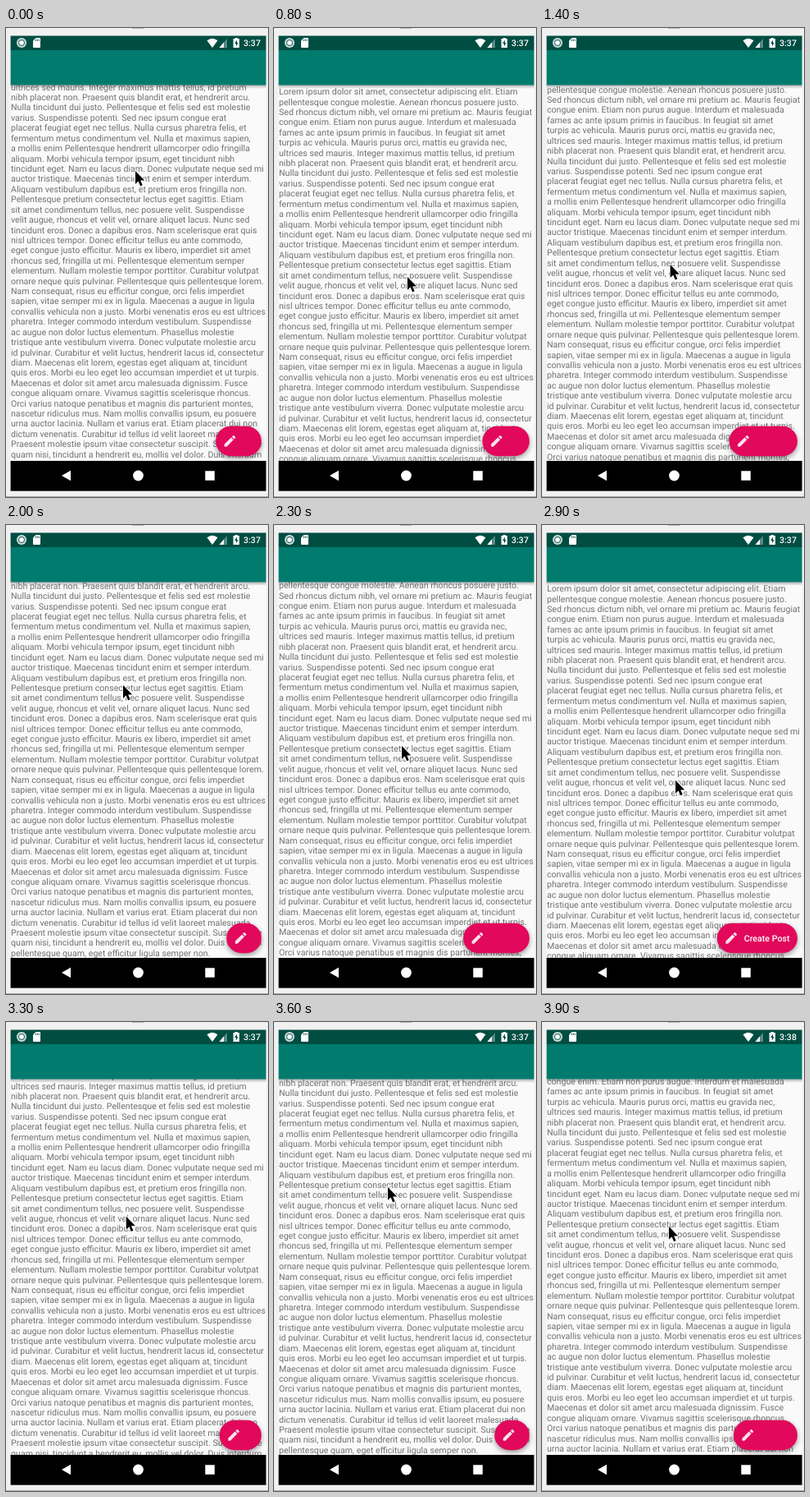
Write an HTML page with a canvas that moves like this. It is 320x571 px and loops after 4000 ms.

```html
<!DOCTYPE html>
<html lang="en">
<head>
<meta charset="utf-8">
<title>Collapsing button on scroll</title>
<style>
  html, body { margin: 0; width: 320px; height: 571px; overflow: hidden; background: #f1f1f1; }
  canvas { display: block; }
</style>
</head>
<body>
<canvas id="stage" width="320" height="571"></canvas>
<script>
const LINES = `Lorem ipsum dolor sit amet, consectetur adipiscing elit. Etiam
pellentesque congue molestie. Aenean rhoncus posuere justo.
Sed rhoncus dictum nibh, vel ornare mi pretium ac. Mauris feugiat
congue enim. Etiam non purus augue. Interdum et malesuada
fames ac ante ipsum primis in faucibus. In feugiat sit amet
turpis ac vehicula. Mauris purus orci, mattis eu gravida nec,
ultrices sed mauris. Integer maximus mattis tellus, id pretium
nibh placerat non. Praesent quis blandit erat, et hendrerit arcu.
Nulla tincidunt dui justo. Pellentesque et felis sed est molestie
varius. Suspendisse potenti. Sed nec ipsum congue erat
placerat feugiat eget nec tellus. Nulla cursus pharetra felis, et
fermentum metus condimentum vel. Nulla et maximus sapien,
a mollis enim Pellentesque hendrerit ullamcorper odio fringilla
aliquam. Morbi vehicula tempor ipsum, eget tincidunt nibh
tincidunt eget. Nam eu lacus diam. Donec vulputate neque sed mi
auctor tristique. Maecenas tincidunt enim et semper interdum.
Aliquam vestibulum dapibus est, et pretium eros fringilla non.
Pellentesque pretium consectetur lectus eget sagittis. Etiam
sit amet condimentum tellus, nec posuere velit. Suspendisse
velit augue, rhoncus et velit vel, ornare aliquet lacus. Nunc sed
tincidunt eros. Donec a dapibus eros. Nam scelerisque erat quis
nisl ultrices tempor. Donec efficitur tellus eu ante commodo,
eget congue justo efficitur. Mauris ex libero, imperdiet sit amet
rhoncus sed, fringilla ut mi. Pellentesque elementum semper
elementum. Nullam molestie tempor porttitor. Curabitur volutpat
ornare neque quis pulvinar. Pellentesque quis pellentesque lorem.
Nam consequat, risus eu efficitur congue, orci felis imperdiet
sapien, vitae semper mi ex in ligula. Maecenas a augue in ligula
convallis vehicula non a justo. Morbi venenatis eros eu est ultrices
pharetra. Integer commodo interdum vestibulum. Suspendisse
ac augue non dolor luctus elementum. Phasellus molestie
tristique ante vestibulum viverra. Donec vulputate molestie arcu
id pulvinar. Curabitur et velit luctus, hendrerit lacus id, consectetur
diam. Maecenas elit lorem, egestas eget aliquam at, tincidunt
quis eros. Morbi eu leo eget leo accumsan imperdiet et ut turpis.
Maecenas et dolor sit amet arcu malesuada dignissim. Fusce
congue aliquam ornare. Vivamus sagittis scelerisque rhoncus.
Orci varius natoque penatibus et magnis dis parturient montes,
nascetur ridiculus mus. Nam mollis convallis ipsum, eu posuere
urna auctor lacinia. Nullam et varius erat. Etiam placerat dui non
dictum venenatis. Curabitur id tellus id velit laoreet malesuada.
Praesent molestie ipsum vitae consectetur suscipit. Suspendisse
quam nisi, tincidunt a hendrerit eu, mollis vel dolor. Duis interdum
pellentesque quam, eget efficitur ligula semper non.`.split('\n');

const LOOP = 4000, TICK = 100, LINE_HEIGHT = 12.42, MAX_SCROLL = 90.3;
const LEFT = 5.6, WIDTH = 312;
const FONT = '10.63px Roboto, sans-serif';

// Pointer stops: time, x, y
const STOPS = [
  [0, 158, 174], [620, 158, 174], [800, 163, 303], [1240, 159, 303], [1900, 142, 195],
  [2000, 143, 195], [2500, 163, 308], [2700, 163, 309], [2950, 163, 311],
  [3520, 139, 201], [3650, 139, 201], [4180, 174, 306],
];
// Button toggles: time, 1 to extend or 0 to shrink
const TOGGLES = [[-245, 0], [669, 1], [1269, 0], [2080, 1], [3018, 0], [3694, 1]];
const TOGGLE_MS = 500;

const PENCIL = new Path2D('M3 17.25V21h3.75L17.81 9.94l-3.75-3.75L3 17.25z' +
  'M20.71 7.04a1 1 0 0 0 0-1.41l-2.34-2.34a1 1 0 0 0-1.41 0l-1.83 1.83 3.75 3.75 1.83-1.83z');
const ARROW = new Path2D('M0 0V16L3.6 12.6L6.1 18.4L8.7 17.3L6.2 11.6H11.2Z');
const SD_CARD = new Path2D('M36.5 12H41Q42 12 42 13V23Q42 24 41 24H34Q33 24 33 23V15.5Z');
const SD_PINS = new Path2D('M36.5 13.5v2.5M38.4 13.5v2.5M40.3 13.5v2.5');
const WIFI = new Path2D('M252 24L245.5 15.3Q252 10.2 258.5 15.3Z');
const SIGNAL = new Path2D('M270 13V24H260.5Z');
const SIGNAL_FULL = new Path2D('M266 17.6V24H260.5Z');
const BATTERY = new Path2D('M279.8 13V12H282.8V13H285V24H277.6V13Z');
const BOLT = new Path2D('M282 14.5L279.2 19H281V22.5L283.6 18H282Z');
const BACK = new Path2D('M68 545L79 538.8V551.2Z');

const ctx = document.getElementById('stage').getContext('2d');
const clamp = (v, lo, hi) => Math.min(hi, Math.max(lo, v));

function pointerAt(t) {
  const i = STOPS.findIndex(stop => stop[0] > t);
  const [t0, x0, y0] = STOPS[i - 1], [t1, x1, y1] = STOPS[i];
  const k = (1 - Math.cos(Math.PI * (t - t0) / (t1 - t0))) / 2;
  return [x0 + (x1 - x0) * k, y0 + (y1 - y0) * k];
}

// cubic-bezier(.4, 0, .2, 1)
function fastOutSlowIn(p) {
  let lo = 0, hi = 1;
  for (let i = 0; i < 16; i++) {
    const s = (lo + hi) / 2, r = 1 - s;
    if (1.2 * r * r * s + 0.6 * r * s * s + s ** 3 < p) lo = s; else hi = s;
  }
  return lo * lo * (3 - 2 * lo);
}

function extensionAt(t) {
  const [start, extend] = TOGGLES.filter(toggle => toggle[0] <= t).pop();
  const k = fastOutSlowIn(clamp((t - start) / TOGGLE_MS, 0, 1));
  return extend ? k : 1 - k;
}

// The page follows the drag and stops at both ends.
const scrolls = [80];
for (let t = TICK; t < LOOP; t += TICK) {
  const dy = pointerAt(t)[1] - pointerAt(t - TICK)[1];
  scrolls.push(clamp(scrolls.at(-1) - dy, 0, MAX_SCROLL));
}

function rect(color, x, y, w, h) {
  ctx.fillStyle = color;
  ctx.fillRect(x, y, w, h);
}

function disc(color, x, y, r) {
  ctx.fillStyle = color;
  ctx.beginPath();
  ctx.arc(x, y, r, 0, 2 * Math.PI);
  ctx.fill();
}

function shape(color, path) {
  ctx.fillStyle = color;
  ctx.fill(path);
}

function text(string, x, y, color, weight = 400) {
  ctx.font = `${weight} ${FONT}`;
  ctx.fillStyle = color;
  ctx.fillText(string, x, y);
}

function drawPage(scroll) {
  rect('#fafafa', LEFT, 69, WIDTH, 458);
  ctx.save();
  ctx.beginPath();
  ctx.rect(LEFT, 69, WIDTH, 458);
  ctx.clip();
  // An invisible skew stops baselines snapping to whole pixels.
  ctx.transform(1, 1e-5, 0, 1, 0, 0);
  LINES.forEach((line, i) => text(line, 6, 81.1 + i * LINE_HEIGHT - scroll, '#717171'));
  ctx.restore();
}

function drawButton(extension) {
  const width = 42.7 + 55.5 * extension, left = 312 - width, top = 484.8;
  ctx.save();
  ctx.beginPath();
  ctx.roundRect(left, top, width, 36.4, 18.2);
  ctx.shadowColor = 'rgba(0,0,0,.4)';
  ctx.shadowBlur = 6;
  ctx.shadowOffsetY = 2.5;
  ctx.fillStyle = '#e2085c';
  ctx.fill();
  ctx.shadowColor = 'transparent';
  ctx.clip();
  ctx.globalAlpha = clamp((extension - 0.8) / 0.2, 0, 1);
  text('Create Post', left + 33, 506.8, '#fff', 500);
  ctx.globalAlpha = 0.88;
  ctx.translate(left + 8.3, top + 9);
  ctx.scale(0.757, 0.757);
  shape('#fff', PENCIL);
  ctx.restore();
}

function drawBars(time) {
  const shadow = ctx.createLinearGradient(0, 69, 0, 74);
  shadow.addColorStop(0, 'rgba(0,0,0,.32)');
  shadow.addColorStop(1, 'rgba(0,0,0,0)');
  rect(shadow, LEFT, 69, WIDTH, 5);
  rect('#007b6d', LEFT, 27, WIDTH, 42.5);
  rect('#004d42', LEFT, 9.5, WIDTH, 17.5);

  disc('#d5e3e1', 19, 18, 6);
  disc('#4b827b', 19, 18, 4.3);
  disc('#fff', 19, 18, 2.8);
  shape('#fff', SD_CARD);
  ctx.strokeStyle = '#004d42';
  ctx.lineWidth = 0.8;
  ctx.stroke(SD_PINS);
  shape('#fff', WIFI);
  shape('rgba(255,255,255,.35)', SIGNAL);
  shape('#fff', SIGNAL_FULL);
  shape('#fff', BATTERY);
  shape('#004d42', BOLT);
  text(time, 290, 22, '#fff', 500);

  rect('#000', LEFT, 527, WIDTH, 36.7);
  shape('#fff', BACK);
  disc('#fff', 161.5, 545, 6.4);
  rect('#fff', 243.3, 539.3, 11.5, 11.5);
}

function drawPointer([x, y]) {
  ctx.save();
  ctx.translate(x, y);
  ctx.lineJoin = 'round';
  ctx.lineWidth = 2;
  ctx.strokeStyle = '#fff';
  ctx.stroke(ARROW);
  shape('#000', ARROW);
  ctx.restore();
}

function frame(now) {
  const tick = Math.floor(now % LOOP / TICK), t = tick * TICK;
  ctx.textRendering = 'geometricPrecision';
  rect('#f1f1f1', 0, 0, 320, 571);
  rect('#b5b5b5', 154, 0, 14, 1);
  rect('#aaa', 0, 570, 320, 1);
  drawPage(scrolls[tick]);
  drawButton(extensionAt(t));
  drawBars(t < 3700 ? '3:37' : '3:38');
  drawPointer(pointerAt(t));
  requestAnimationFrame(frame);
}
requestAnimationFrame(frame);
</script>
</body>
</html>
```
